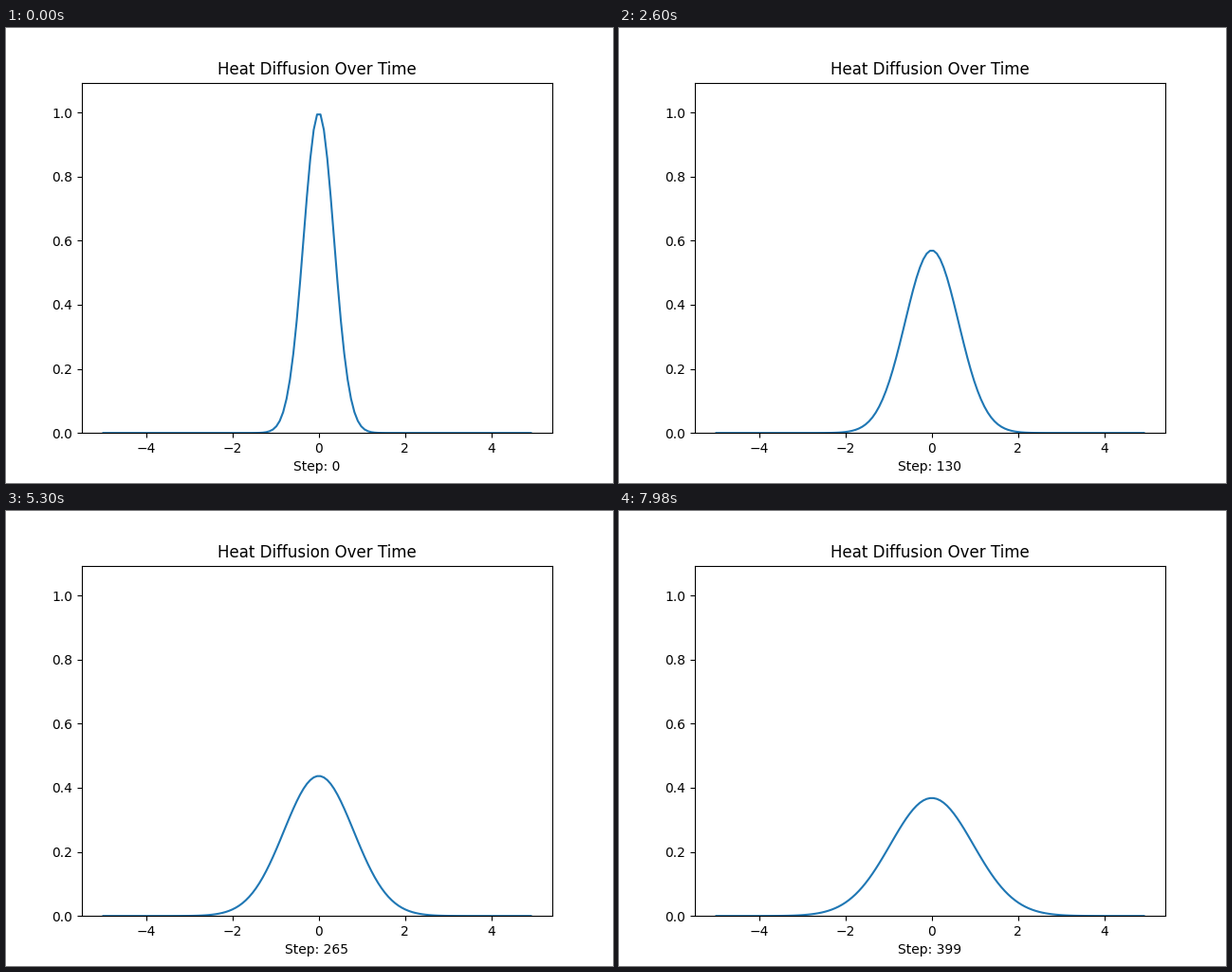
Animation, 640 px wide and 480 px high, one loop 8000 ms. Source, as a matplotlib script:

```python
import numpy as np
import matplotlib.pyplot as plt
from matplotlib.animation import FuncAnimation

STEPS = 400
INTERVAL = 20            # ms per step
DIFFUSIVITY = 0.1
DT = 0.01
SHARPNESS = 4.0          # initial profile: exp(-SHARPNESS * x^2)

x = np.linspace(-5, 5, 128)[:-1]


def heat(step):
    """Temperature along the rod: a Gaussian that spreads while keeping its area."""
    spread = 1 + 4 * SHARPNESS * DIFFUSIVITY * DT * step
    return np.exp(-SHARPNESS * x**2 / spread) / np.sqrt(spread)


fig, ax = plt.subplots(figsize=(6.4, 4.8), dpi=100)
line, = ax.plot(x, heat(0))
ax.set_ylim(0, 1.1 * heat(0).max())
ax.set_title("Heat Diffusion Over Time")


def update(step):
    line.set_ydata(heat(step))
    ax.set_xlabel(f"Step: {step}")
    return line,


def init():
    return update(0)


anim = FuncAnimation(fig, update, frames=STEPS, init_func=init,
                     interval=INTERVAL, repeat=True, repeat_delay=0, blit=False)
plt.show()
```
